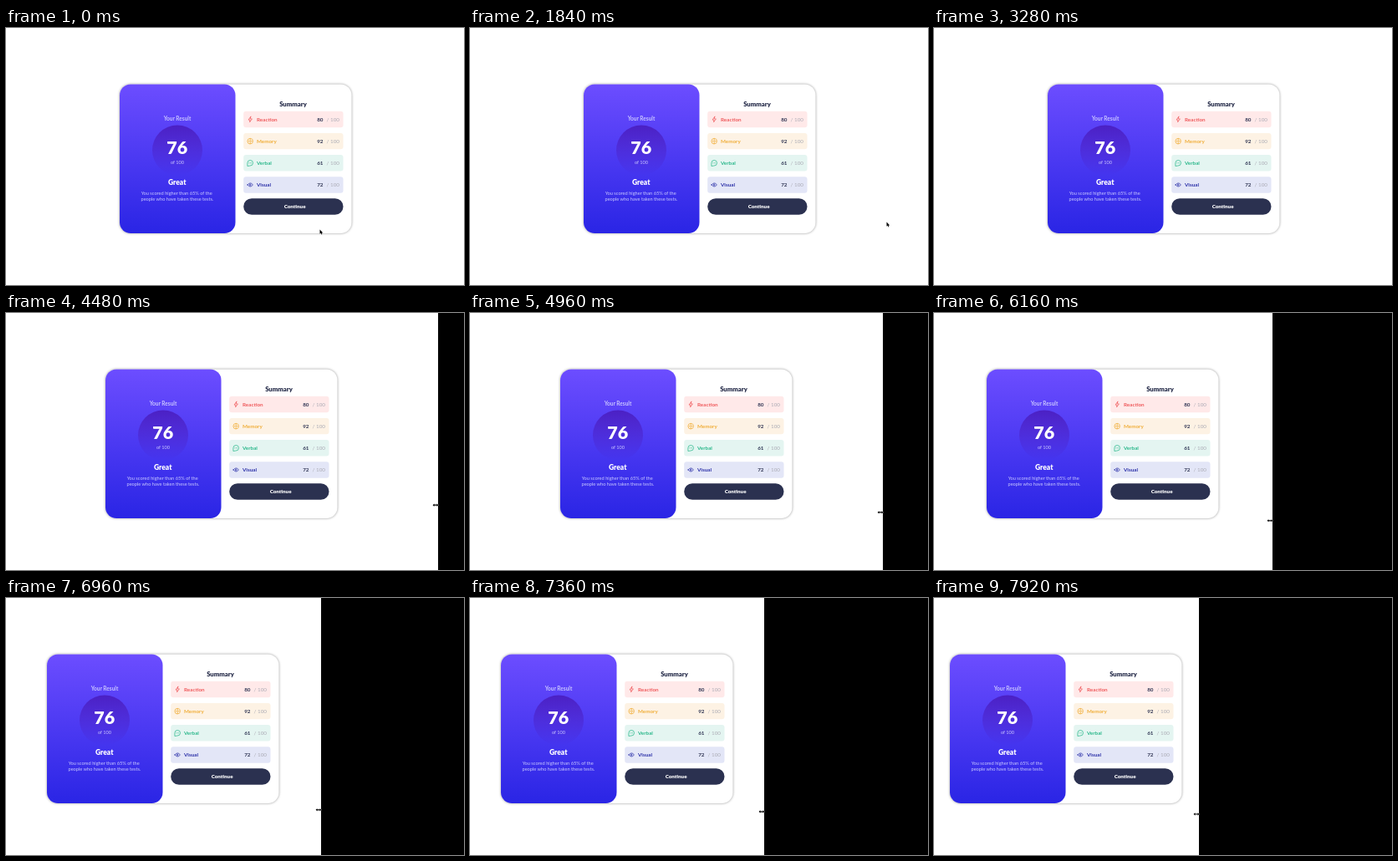
Write an HTML page that moves like this. It is 548x308 px and loops after 8000 ms.

```html
<!DOCTYPE html>
<html lang="en">
<head>
<meta charset="utf-8">
<title>Result summary</title>
<style>
html, body { margin: 0; width: 100%; height: 100%; overflow: hidden; background: #fff; }
svg { display: block; width: 548px; height: 308px; }
text { font-family: Lato, "Open Sans", sans-serif; font-weight: 700; }
.mid { text-anchor: middle; }
.heavy { font-weight: 900; }
.thin { font-weight: 400; }
.icon { fill: none; stroke-width: .75; stroke-linejoin: round; stroke-linecap: round; }
.cursor { stroke: #fff; stroke-width: .7; paint-order: stroke; }
#card { filter: drop-shadow(0 0 1.4px rgba(0, 0, 0, .42)); }
</style>
</head>
<body>
<svg viewBox="0 0 548 308">
  <defs>
    <linearGradient id="panel" x2="0" y2="1">
      <stop stop-color="#6c4dff"/><stop offset="1" stop-color="#2a25e5"/>
    </linearGradient>
    <linearGradient id="disc" x2="0" y2="1">
      <stop stop-color="#4b20c4"/><stop offset="1" stop-color="#4b20c4" stop-opacity="0"/>
    </linearGradient>
  </defs>
  <g id="page">
    <rect id="card" x="136" y="67.5" width="277.5" height="178.5" rx="13" fill="#fff"/>
    <rect x="136" y="67.5" width="138.5" height="178.5" rx="13" fill="url(#panel)"/>
    <circle cx="205" cy="146.5" r="30" fill="url(#disc)"/>
    <g class="mid" fill="#fff">
      <text x="205" y="110.7" font-size="6.5" fill="#c9c5ff">Your Result</text>
      <text x="204.7" y="150.5" font-size="21.5" class="heavy">76</text>
      <text x="205" y="163" font-size="5.6" fill="#c9c5ff" class="thin">of 100</text>
      <text x="204.7" y="188.3" font-size="8.5" class="heavy">Great</text>
      <g font-size="5.65" fill="#c9c9ff" class="thin">
        <text x="204.2" y="200.2" class="thin">You scored higher than 65% of the</text>
        <text x="204.9" y="207.4" class="thin">people who have taken these tests.</text>
      </g>
      <text x="343.5" y="94" font-size="7.7" fill="#252b49" class="heavy">Summary</text>
    </g>
    <g id="rows"></g>
    <rect x="284.2" y="204.2" width="119.3" height="19.6" rx="9.8" fill="#2b3150"/>
    <text class="mid heavy" x="345.6" y="216.1" font-size="6.25" fill="#fff">Continue</text>
  </g>
  <rect id="cover" width="548" height="308"/>
  <path id="arrow" class="cursor" d="M0 0V5.2L1.2 4.2 2 6.1 2.9 5.7 2.1 3.9H3.7Z"/>
  <path id="resize" class="cursor" d="M-3.4 0L-1.6 -1.7V-.6H1.6V-1.7L3.4 0 1.6 1.7V.6H-1.6V1.7Z"/>
</svg>
<script>
const $ = id => document.getElementById(id);

// label, score, ink, background, icon path around (0, 0)
const rows = [
  ["Reaction", 80, "#ef5a5c", "#ffe9e9", "M.6 -3.3L-2.2 .6H-.3L-.6 3.3 2.2 -.6H.3Z"],
  ["Memory", 92, "#f0ae3a", "#fdf2e4", "M0 -3.3V3.3A3.3 3.3 0 0 1 0 -3.3A3.3 3.3 0 0 1 0 3.3M-2.2 0H-1M1 0H2.2"],
  ["Verbal", 61, "#2cb88c", "#e4f5f1", "M-3.3 3.3V0A3.3 3.3 0 1 1 0 3.3ZM-1.4 0H-1.3M0 0H.1M1.4 0H1.5"],
  ["Visual", 72, "#2b30a8", "#e3e6f7", "M-3.2 0Q0 -4.2 3.2 0Q0 4.2 -3.2 0ZM-.8 0A.8 .8 0 1 1 .8 0A.8 .8 0 1 1 -.8 0"]
];
$("rows").innerHTML = rows.map(([label, score, ink, back, icon], i) => `
  <g transform="translate(284.2 ${99.8 + i * 26.15})" font-size="6.3">
    <rect width="119.3" height="19.4" rx="3" fill="${back}"/>
    <path class="icon" transform="translate(8 9.7)" stroke="${ink}" d="${icon}"/>
    <text x="15.8" y="11.9" fill="${ink}">${label}</text>
    <text x="88" y="11.9" fill="#2b3150">${score}</text>
    <text x="99.4" y="11.9" fill="#aaaab4" class="thin">/ 100</text>
  </g>`).join("");

const FULL = 550, GRAB = 4080;
const part = (t, a, b) => Math.min(1, Math.max(0, (t - a) / (b - a)));
const smooth = p => p * p * (3 - 2 * p);
const move = (id, x, y) => $(id).setAttribute("transform", `translate(${x} ${y})`);
const show = (id, on) => $(id).style.display = on ? "" : "none";

// The window edge is dragged left at an uneven hand speed: [time, width]
const drag = [[GRAB, FULL], [4480, 518], [5280, 479], [6160, 405.5], [6960, 377.5], [7920, 317]];
const widthAt = t => drag.slice(1).reduce((w, [end, to], i) => {
  const [start, from] = drag[i];
  return w + (to - from) * part(t, start, end);
}, FULL);

function draw(now) {
  const t = now % 8000, w = Math.floor(widthAt(t));
  move("page", Math.floor((w - FULL) / 2), 0);
  move("cover", w, 0);

  // The pointer swings right in an arc, rests, then leaves the stage
  const swing = smooth(part(t, 880, 1760)), leave = smooth(part(t, 1880, 2400));
  move("arrow", 375.5 + 123 * swing + 54 * leave,
    241.5 - 9 * swing + 14 * Math.sin(Math.PI * swing));
  move("resize", w - 3, 230 + 29 * part(t, 4480, 7920) ** .6);
  show("arrow", t < GRAB);
  show("resize", t >= GRAB);
  requestAnimationFrame(draw);
}
requestAnimationFrame(draw);
</script>
</body>
</html>
```
